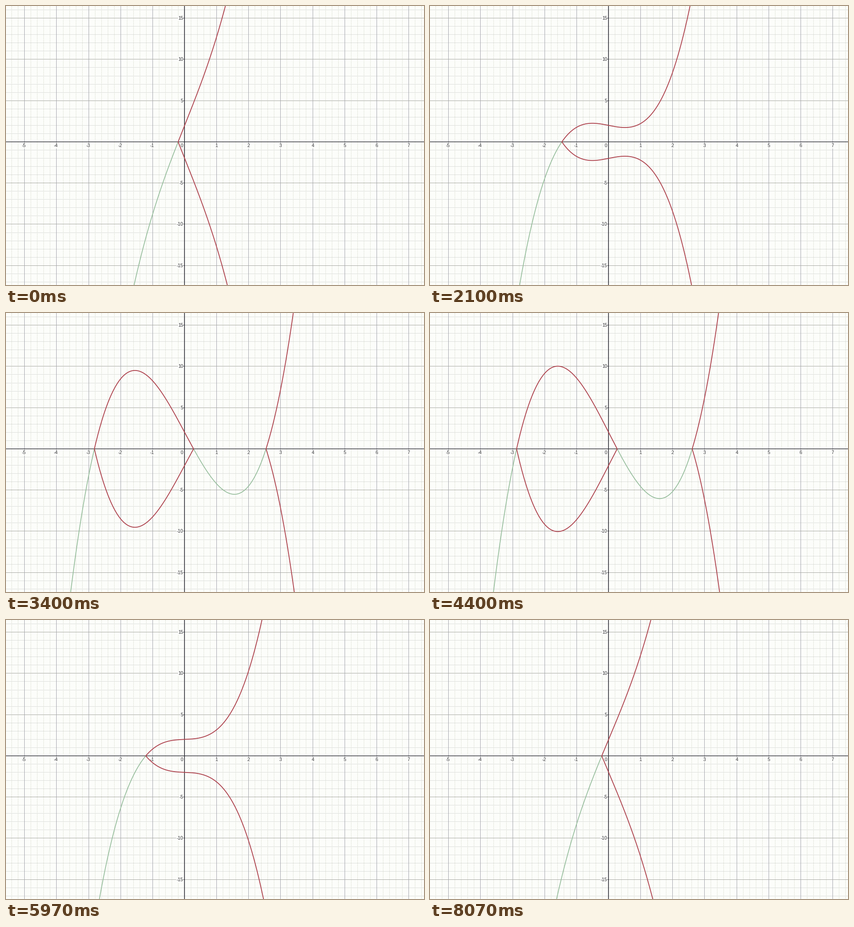
A matplotlib script for the animation above (8.1 s loop, 916 px wide and 611 px high).

```python
import numpy as np
import matplotlib.pyplot as plt
from matplotlib.animation import FuncAnimation
from matplotlib.collections import LineCollection

W, H, DPI = 916, 611, 100
LOOP, STEP = 8100, 20
HOLD = 100 / 3             # the pose changes 30 times a second
X0, Y0 = 391, 296.95       # origin in pixels
UX, UY = 70.13, 18.05      # pixels per unit
B = 2                      # constant term of x^3 + a x + B

# The slider bounces between 10 and -10 at about five units a second.
KNOT_MS = [0, 1467, 2100, 3400, 3932, 4400, 5967, 7921, 8100]
KNOT_A = [9.76, 2.32, -0.77, -7.25, -10, -7.58, 0.17, 10, 9.08]

plt.rcParams["font.family"] = "Liberation Sans"
fig = plt.figure(figsize=(W / DPI, H / DPI), dpi=DPI, facecolor="#fcfdfa")
ax = fig.add_axes([0, 0, 1, 1])
ax.set_xlim(0, W)
ax.set_ylim(H, 0)
ax.axis("off")


def pt(px):
    return px * 72 / DPI


def col(u):
    return np.round(X0 + UX * u) + 0.5


def row(v):
    return np.round(Y0 - UY * v) + 0.5


def lines(segments, color, width=1.0, z=1, style="solid"):
    ax.add_collection(LineCollection(
        segments, colors=color, linewidths=pt(width), linestyles=style,
        zorder=z, snap=False, antialiaseds=True))


def vertical(units):
    return [[(col(u), 0), (col(u), H)] for u in units]


def horizontal(units):
    return [[(0, row(v)), (W, row(v))] for v in units]


def label(x, y, text, ha):
    box = dict(facecolor="#fcfdfa", edgecolor="none", pad=0.3)
    ax.text(x, y, text, ha=ha, va="center_baseline", fontsize=pt(10),
            color="#333338", zorder=4, bbox=box)


# Grid
lines(vertical(k / 5 for k in range(-27, 38) if k % 5), "#dcdfd2",
      style=(0, (2.5, 1.2)))
lines(horizontal(k for k in range(-17, 17) if k % 5), "#dddfdc")
x_marks = [k for k in range(-5, 8) if k]
y_marks = [k for k in range(-15, 16, 5) if k]
lines(vertical(x_marks), "#a5a5ae", z=2)
lines(horizontal(y_marks), "#a8a9a4", z=2)

# Axes, ticks and numbers
lines([[(X0 + 0.2, 0), (X0 + 0.2, H)]], "#303039", 1.6, z=5)
lines(horizontal([0]), "#303039", 1.4, z=5)
lines([[(X0 - 2.5, row(k)), (X0, row(k))] for k in y_marks], "#303039", z=5)
for k in x_marks:
    label(col(k) - (1.3 if k < 0 else 0), 305.2, str(k), "center")
for k in y_marks:
    label(388.3, row(k) - 0.2, str(k), "right")
label(388.3, 305.2, "0", "right")

# Curves
x = np.linspace(-5.6, 5.6, 4000)
px = X0 + UX * x + 0.5


def curve(color, width, z):
    return ax.plot([], [], color=color, lw=pt(width), zorder=z,
                   solid_joinstyle="round")[0]


green = curve("#95bd9b", 1.7, 6)
upper = curve("#ad404b", 1.8, 7)
lower = curve("#ad404b", 1.8, 7)
edge_mark, = ax.plot([915.5, 915.5], [3, 14], color="#202020", lw=pt(1.2),
                     zorder=8, visible=False)


def place(line, y, keep):
    keep = keep & (np.abs(y) < 20)
    line.set_data(px[keep], Y0 - UY * y[keep] + 0.6)


def place_parts(line, y, keep):
    keep = keep & (np.abs(y) < 20)
    line.set_data(px, np.where(keep, Y0 - UY * y + 0.6, np.nan))


def update(i):
    t = np.round(i * STEP / HOLD) * HOLD
    y = x**3 + np.interp(t, KNOT_MS, KNOT_A) * x + B
    place_parts(green, y, y <= 0)
    place_parts(upper, y, y >= 0)
    place_parts(lower, -y, y >= 0)
    edge_mark.set_visible(t > LOOP - 1.5 * HOLD)
    return green, upper, lower, edge_mark


anim = FuncAnimation(fig, update, frames=LOOP // STEP, interval=STEP,
                     repeat=True, repeat_delay=0, blit=False)
plt.show()
```
